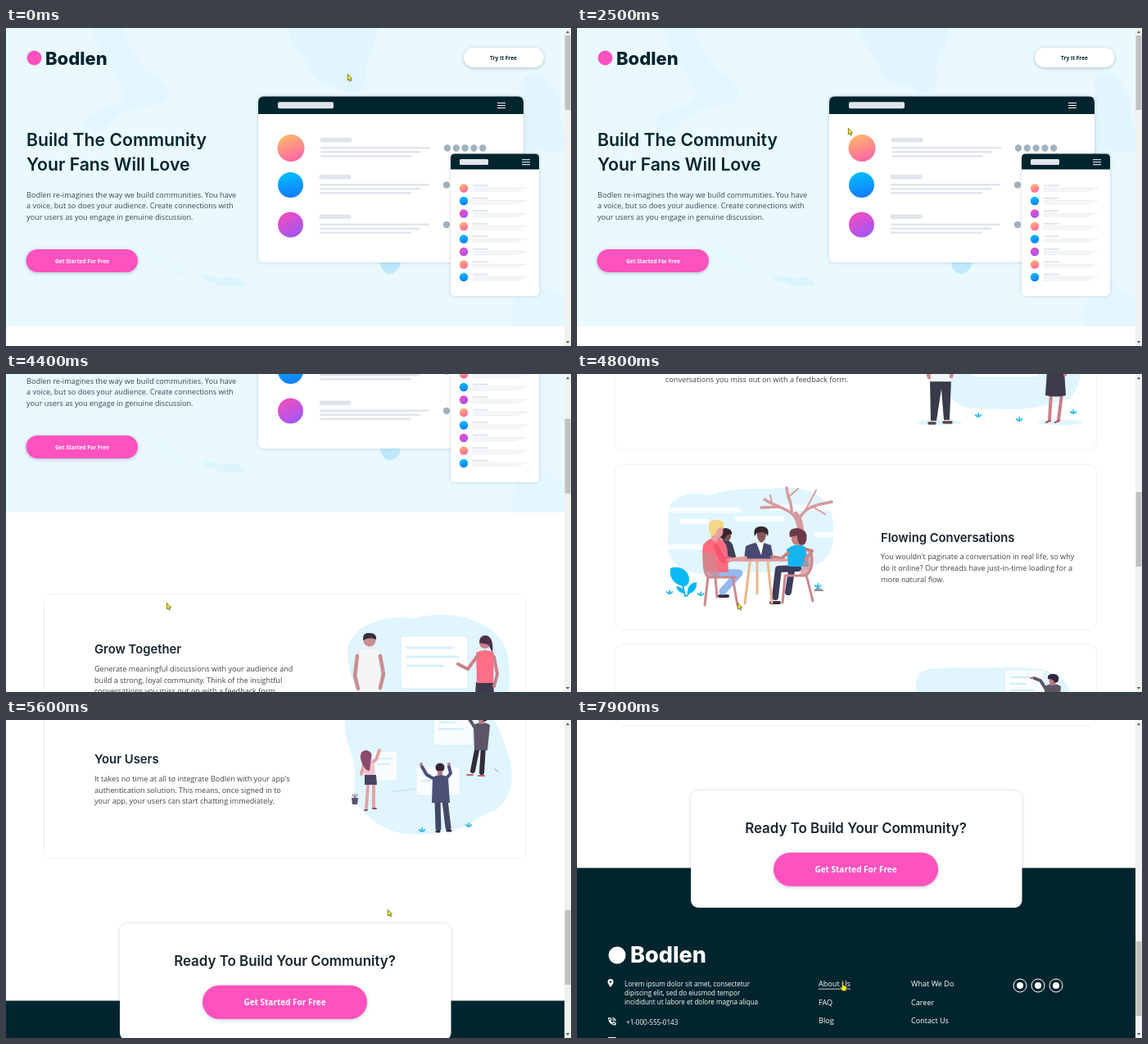
An HTML page that plays this animation: 690 by 388 pixels, repeating every 8 s.

```html
<!DOCTYPE html>
<html lang="en">
<head>
<meta charset="utf-8">
<title>Bodlen landing page</title>
<style>
html, body { margin: 0; width: 100%; height: 100%; overflow: hidden; background: #fff; }
svg { display: block; width: 690px; height: 388px; }
text { font: 9.1px "Open Sans", sans-serif; fill: #3d464d; }
.h, .logo { font-family: Inter, sans-serif; font-weight: 600; fill: #00252e; }
.h1 { font-size: 21.2px; }
.h2 { font-size: 14.8px; fill: #17262f; }
.h3 { font-size: 16.9px; fill: #17262f; }
.logo { font-weight: 800; font-size: 22px; }
.btn { font-weight: 700; font-size: 6.6px; fill: #fff; text-anchor: middle; }
.foot text { fill: #fff; }
.foot .small { font-size: 8.1px; }
.card { fill: #fff; stroke: #f6f0ec; }
.lift { filter: drop-shadow(0 1px 2px #00252e40); }
.soft { filter: drop-shadow(0 0 2px #00252e30); }
.line { fill: none; stroke-linecap: round; stroke-linejoin: round; }
</style>
</head>
<body>
<svg viewBox="0 0 690 388">
  <defs>
    <linearGradient id="warm" x1=".3" y1="0" x2=".7" y2="1"><stop stop-color="#ffb76c"/><stop offset="1" stop-color="#ff62a8"/></linearGradient>
    <linearGradient id="blue" x1=".4" y1="0" x2=".6" y2="1"><stop stop-color="#00bdff"/><stop offset="1" stop-color="#147bff"/></linearGradient>
    <linearGradient id="plum" x1=".2" y1="0" x2=".8" y2="1"><stop stop-color="#f74cbb"/><stop offset="1" stop-color="#9a58fb"/></linearGradient>
    <path id="tuft" fill="#2cbcf0" d="M0 3Q-4 2-4.500-1Q-2-1-.5 1Q-1.500-2 .5-3.500Q1.500-1.500 1 1Q2-1 4.500-1Q4 2 0 3Z"/>
  </defs>
  <g id="page">
    <path fill="#fff" d="M0 0H682V1630H0Z"/>
    <path fill="#e9f9ff" d="M0 0H682V364H0Z"/>
    <g fill="#d6f1fc" opacity=".6">
      <path d="M143 0C150 25 160 42 178 58C202 68 203 90 184 94C160 94 135 102 122 122C105 132 90 120 99 109C113 95 140 100 145 82C142 62 118 38 104 0Z" opacity=".55"/>
      <path d="M344 0C350 26 366 32 372 54C380 72 405 66 416 78C428 82 444 71 441 58C432 42 450 34 455 0Z" opacity=".7"/>
      <path d="M632 62C650 46 661 60 670 76C682 90 672 109 682 124V150C664 154 648 146 632 150Z" opacity=".6"/>
      <path d="M238 303C250 296 258 309 271 304C284 302 291 309 291 315H262C253 309 243 311 238 303Z"/>
      <path d="M160 262C178 270 198 275 216 294C230 302 212 308 202 299C184 288 168 282 160 262Z" opacity=".3"/>
      <path d="M628 287C644 300 660 322 682 327V364H620C609 344 636 321 628 287Z" opacity=".35"/>
    </g>
    <path fill="#bfe9fb" d="M457 286H482C482 294 474 300 469 300C463 300 457 294 457 286Z"/>

    <circle cx="34.5" cy="36.5" r="9" fill="#ff52bf"/>
    <text class="logo" x="48" y="44.5">Bodlen</text>
    <rect class="lift" x="559" y="24" width="97.500" height="24" rx="12" fill="#fff"/>
    <text class="btn" x="607.5" y="38.5" style="fill:#00252e">Try It Free</text>
    <text class="h h1" x="25" y="144">Build The Community</text>
    <text class="h h1" x="25" y="174">Your Fans Will Love</text>
    <g id="intro"></g>
    <rect class="lift" x="24.500" y="270" width="136.500" height="28" rx="14" fill="#ff52bf"/>
    <text class="btn" x="93" y="286.500">Get Started For Free</text>

    <g id="mock"></g>

    <rect class="card" x="46.500" y="463" width="588" height="204" rx="9"/>
    <rect class="card" x="46.500" y="685" width="588" height="202" rx="9"/>
    <rect class="card" x="46.500" y="905" width="588" height="214" rx="9"/>
    <text class="h h2" x="108" y="535.500">Grow Together</text>
    <text class="h h2" x="371" y="779.500">Flowing Conversations</text>
    <text class="h h2" x="108" y="1002.800">Your Users</text>
    <g id="copy"></g>

    <!-- two people at a board -->
    <g transform="translate(0 575)">
      <path fill="#e0f5fe" d="M418-30C410-68 454-88 500-82C550-96 612-74 614-28C618 4 612 20 602 30C570 38 556 44 526 43C490 42 470 46 456 28C434 16 422 4 418-30Z"/>
      <g fill="#e0f5fe"><ellipse cx="442" cy="59" rx="28" ry="3.500"/><ellipse cx="590" cy="59" rx="27" ry="3.500"/></g>
      <rect x="482" y="-60" width="82" height="64" rx="3" fill="#fff" stroke="#d5effa"/>
      <path class="line" stroke="#d5effa" stroke-width="3" d="M490-46H545M490-35H552M490-24H534"/>
      <path fill="#3a3b49" d="M431 6H457L455 56H448L445 18L439 57H432Z"/>
      <path fill="#f3f5f7" stroke="#d8dde2" stroke-width=".6" d="M430-42Q444-50 457-42L458 9H430Z"/>
      <path class="line" stroke="#c98e8f" stroke-width="4.500" d="M429-36L426-12L430 4M457-36L461-14L457 3"/>
      <circle cx="444" cy="-55" r="7.500" fill="#c98e8f"/><path fill="#33303f" d="M436-55Q435-65 444-64Q453-64 452-56Q444-60 436-55Z"/>
      <path class="line" stroke="#5b414a" stroke-width="3.500" d="M430 60H437M448 59H457"/>
      <path class="line" stroke="#c98088" stroke-width="4" d="M579 24L577 56M592 24L588 56"/>
      <path fill="#3d3a4c" d="M574-4H595L597 26Q585 29 572 26Z"/>
      <path fill="#ff6f86" d="M574-40Q585-46 596-40L595-3H575Z"/>
      <path class="line" stroke="#c98088" stroke-width="4" d="M575-35L564-20L552-26M596-35L600-14L596 1"/>
      <circle cx="585" cy="-52" r="7" fill="#c98088"/><path fill="#4b3049" d="M578-52Q578-62 587-61Q596-58 594-40L589-50Z"/>
      <path class="line" stroke="#c04a60" stroke-width="2.200" d="M573 59L578 57M584 59L589 57"/>
      <use href="#tuft" x="490" y="50"/><use href="#tuft" x="540" y="55"/><use href="#tuft" x="606" y="46"/>
    </g>

    <!-- friends around a table -->
    <g transform="translate(0 575)">
      <path fill="#e0f5fe" d="M112 176C107 151 136 140 162 148C196 136 224 142 250 139C286 136 314 153 313 187C315 210 309 228 288 234C255 246 225 240 188 244C148 250 112 238 111 211Z"/>
      <path class="line" stroke="#fff" stroke-width="7" opacity=".8" d="M108 166H196M128 180H158M238 163H315M196 177H250M292 196H315M108 211H150"/>
      <path class="line" stroke="#d79a9d" stroke-width="8" d="M273 196Q274 182 267 172"/>
      <path class="line" stroke="#d79a9d" stroke-width="3.500" d="M270 180C262 164 246 164 229 153M247 162L225 163M262 169C263 158 257 150 256 139M271 178C277 164 288 160 311 156"/>
      <path class="line" stroke="#d79a9d" stroke-width="2" d="M279 166L292 142M286 161L303 171M257 151L270 140M238 157L236 148"/>
      <path class="line" stroke="#00a9e8" stroke-width="1.800" d="M132 271L127 249M134 271L142 260"/>
      <path fill="#08b9f4" d="M130 259C118 257 112 247 114 237C125 233 138 240 137 252C136 257 133 260 130 259ZM132 268C127 268 122 264 121 259C127 259 131 263 132 268ZM135 268C134 260 139 254 146 254C147 262 142 268 135 268Z"/>
      <path class="line" stroke="#3c2f3c" stroke-width="4" d="M174 271H184M237 279H247"/>
      <path fill="#3f3d56" d="M174 205Q184 199 190 208L195 226H176Z"/>
      <circle cx="182" cy="198" r="6" fill="#7f4e50"/><path fill="#39262f" d="M173 199Q172 188 182 188Q190 189 189 196Q183 194 180 202Z"/>
      <path fill="#464a70" d="M206 210Q222 202 237 209L240 226H204Z"/><path fill="#fff" d="M219 206H228L225 221Z"/>
      <path fill="#87565a" d="M220 193H231Q231 204 225 206Q219 203 220 193Z"/><path fill="#39262f" d="M217 198Q214 186 225 186Q236 186 233 198Q231 193 225 193Q219 193 217 198Z"/>
      <path class="line" stroke="#93b9f0" stroke-width="9" d="M166 242L198 243L178 265"/>
      <path fill="#ff6b80" d="M154 209Q162 197 174 200Q184 206 184 218L185 242H158Q151 224 154 209Z"/>
      <path class="line" stroke="#f2566f" stroke-width="7" d="M170 211L178 227L186 226"/>
      <path class="line" stroke="#e8a1a0" stroke-width="3.500" d="M188 226L206 224"/>
      <path fill="#e8a1a0" d="M165 187H178Q180 199 172 200L171 206L164 202Z"/><path fill="#f5d883" d="M164 198Q156 180 168 178Q181 177 179 187Q171 186 169 196Z"/>
      <path class="line" stroke="#3c3d5c" stroke-width="8" d="M270 237L246 238L242 272M262 240L258 266"/>
      <path fill="#14b4ee" d="M256 214Q268 205 279 211L283 235H258Z"/>
      <path class="line" stroke="#c77f82" stroke-width="4" d="M258 218L250 225L238 223M280 214L287 216L279 226"/>
      <path fill="#c77f82" d="M262 196H274V209L265 208Q261 204 262 196Z"/><path fill="#6b3a48" d="M260 199Q257 188 269 188Q283 190 280 203Q278 211 272 208Q268 203 269 197Z"/>
      <path class="line" stroke="#cb8990" stroke-width="3" d="M156 219Q153 240 160 248H194M160 247L156 282M190 248L196 282M169 248L171 272M286 217Q290 236 280 246H254M254 247L251 279M280 245L288 277"/>
      <path fill="#cb8990" opacity=".7" d="M154 219Q165 216 169 222L174 247H160Q152 236 154 219ZM286 217L279 222Q274 236 272 246H281Q289 233 286 217Z"/>
      <path class="line" stroke="#dd9da0" stroke-width="3.500" d="M184 227H256"/>
      <path class="line" stroke="#eab88d" stroke-width="3" d="M211 230L205 280M233 230L238 279M220 229V268"/>
      <path fill="#8696a3" d="M289 265Q293 257 302 265Z"/>
      <use href="#tuft" x="113" y="266"/><use href="#tuft" x="151" y="268"/><use href="#tuft" x="294" y="258"/>
    </g>

    <!-- team pinning notes -->
    <g transform="translate(0 950)">
      <path fill="#e0f5fe" d="M414 1C417-21 443-14 463-17C500-14 528-21 566-14C599-11 601 10 609 29C623 60 621 97 596 111C574 117 561 137 528 137C493 144 465 138 443 118C414 96 432 66 423 45C418 29 412 18 414 1Z"/>
      <g fill="#f9fdff" stroke="#d5eef9">
        <rect x="522" y="-14" width="48" height="45" rx="2"/><rect x="448" y="38" width="30" height="36" rx="2"/><rect x="501" y="57" width="54" height="35" rx="2"/>
      </g>
      <path class="line" stroke="#c6e7f6" stroke-width="1.500" d="M529-5H555M529 3H548M529 11H558M453 47H472M453 54H468M508 66H520M508 74H519M470 88L500 84"/>
      <path class="line" stroke="#e3a0a2" stroke-width="3.800" d="M442 80L440 108M449 80L449 106M446 54L452 48L456 37M437 54L434 66"/>
      <path fill="#f3c3cc" d="M436 51Q444 46 450 53L451 69H438Z"/><path fill="#474463" d="M438 67H452L453 79H438Z"/>
      <path fill="#8d4a6c" d="M433 47Q432 36 441 37Q448 39 446 47L444 62Q437 62 433 47Z"/>
      <path class="line" stroke="#8d4a6c" stroke-width="2" d="M438 110H441M448 108H452"/>
      <path class="line" stroke="#454768" stroke-width="7" d="M527 98L528 132M536 98L540 131"/>
      <path fill="#4c5076" d="M521 70Q531 64 540 70L542 101H520Z"/>
      <path class="line" stroke="#4c5076" stroke-width="4" d="M523 72L514 67L508 57M538 71L543 65L541 57"/>
      <circle cx="507" cy="54" r="2" fill="#b87680"/><circle cx="541" cy="54" r="2" fill="#b87680"/>
      <circle cx="530" cy="58" r="5.500" fill="#35263a"/><path fill="#b87680" d="M527 62H533V67H527Z"/>
      <path class="line" stroke="#2f2e41" stroke-width="3" d="M526 136H529M539 135H543"/>
      <path class="line" stroke="#302d38" stroke-width="6" d="M576 32L570 62M583 32L581 64"/>
      <path fill="#5d5566" d="M571 6Q582 0 591 6L588 37H572Z"/><path class="line" stroke="#5d5566" stroke-width="4" d="M573 10L566-1L558-4"/>
      <path class="line" stroke="#c9656f" stroke-width="2" d="M554-4H557M563 67H570M577 68H584"/>
      <path fill="#b87680" d="M576-4H584V5H578Z"/><path fill="#35263a" d="M575-3Q574-10 582-9Q591-8 587 1L583 2Q583-3 575-3Z"/>
      <path fill="#57536e" d="M422 95H430L429 103H423Z"/><path class="line" stroke="#57536e" d="M426 95V90M425 94L423 91M427 94L429 91"/>
      <use href="#tuft" x="508" y="134"/><use href="#tuft" x="565" y="128"/><path class="line" stroke="#8696a3" d="M597 60L601 63"/>
    </g>

    <path fill="#00252e" d="M0 1292.500H682V1630H0Z"/>
    <rect class="soft" x="139" y="1198.300" width="404.500" height="142.700" rx="9" fill="#fff"/>
    <text class="h h3" x="340.500" y="1249.500" text-anchor="middle">Ready To Build Your Community?</text>
    <rect id="cta" class="lift" x="240" y="1273.700" width="201" height="41" rx="20.500" fill="#ff52bf"/>
    <text class="btn" x="340.500" y="1297.500" style="font-size:10px">Get Started For Free</text>
    <g class="foot" transform="translate(0 1112)">
      <circle cx="49" cy="287" r="10.500" fill="#fff"/>
      <text class="logo" x="65" y="296" style="font-size:27px">Bodlen</text>
      <path fill="#fff" fill-rule="evenodd" d="M41 326C38 322 37.500 321 37.500 319.500A3.500 3.500 0 0 1 44.500 319.500C44.500 321 44 322 41 326ZM39.800 319.500A1.200 1.200 0 0 0 42.200 319.500A1.200 1.200 0 0 0 39.800 319.500Z"/>
      <path class="line" stroke="#fff" stroke-width="1.200" d="M39 363.500L41 363.500L41.500 366L40.500 367Q41.500 369 43.500 370L44.500 369L47 369.700V371.800Q40 372.500 38.500 364ZM43.500 363.500Q46.500 364 47 367M43.500 365.500Q45 366 45 367.300"/>
      <rect x="38" y="387" width="9.500" height="7" fill="#fff"/>
      <text class="small" x="58" y="325">Lorem ipsum dolor sit amet, consectetur</text>
      <text class="small" x="58" y="336">dipiscing elit, sed do eiusmod tempor</text>
      <text class="small" x="58" y="347">incididunt ut labore et dolore magna aliqua</text>
      <text class="small" x="60" y="371.500">+1-000-555-0143</text>
      <g id="links"></g>
      <path id="under" fill="#fff" d="M295 327.700H334V328.500H295Z"/>
      <g fill="none" stroke="#fff"><circle cx="541" cy="324" r="8"/><circle cx="563" cy="324" r="8"/><circle cx="585" cy="324" r="8"/></g>
      <g fill="#fff"><circle cx="541" cy="324" r="4"/><circle cx="563" cy="324" r="4"/><circle cx="585" cy="324" r="4"/></g>
    </g>
  </g>

  <path fill="#f1f1f1" d="M682 0H690V388H682Z"/>
  <path fill="#555" d="M683.800 6.200L686 3.500L688.200 6.200ZM683.800 382L686 384.700L688.200 382Z"/>
  <rect id="thumb" x="682.500" width="7" height="91" fill="#c1c1c1"/>
  <g id="pointer" fill="#f7ee1c" stroke="#4d4b26" stroke-width=".7" stroke-linejoin="round">
    <path id="arrow" d="M.3 .3V8L2 6.500L3.300 9.200L4.600 8.600L3.400 6H5.600Z"/>
    <path id="hand" d="M-.8 .2Q0-.8 .9 .2V4L4.300 5Q5 5.300 4.800 6.500L4 10.500H-.2L-2.800 6.600Q-2.600 5.300-.8 6.300Z"/>
  </g>
</svg>
<script>
const $ = id => document.getElementById(id);
const bar = (x, y, w, h, fill, more = "") =>
  `<rect x="${x}" y="${y}" width="${w}" height="${h}" fill="${fill}" ${more}/>`;
const dot = (x, y, r, fill) => `<circle cx="${x}" cy="${y}" r="${r}" fill="${fill}"/>`;
const lines = (x, y, step, list) =>
  list.map((s, i) => `<text x="${x}" y="${y + i * step}">${s}</text>`).join("");

const tints = ["url(#warm)", "url(#blue)", "url(#plum)"];
const ink = "#00252e", pale = "#e0e5ec", grey = "#a2b3bf";

function frame(x, y, w, h, head, r) {
  return bar(x, y, w, h, "#fff", `rx="${r}" class="soft"`) +
    `<path fill="${ink}" d="M${x} ${y + head}V${y + r}Q${x} ${y} ${x + r} ${y}H${x + w - r}Q${x + w} ${y} ${x + w} ${y + r}V${y + head}Z"/>`;
}
const burger = (x, y) => [0, 3, 6].map(d => bar(x, y + d, 10, 1, "#fff")).join("");

function mock() {
  let s = frame(308, 83.5, 324, 202.5, 21.5, 7);
  s += bar(332, 90.3, 68, 8, pale, 'rx="2"') + burger(600, 91);
  [146.5, 191.5, 240].forEach((y, i) => {
    const x = i ? 383 : 384;
    s += dot(i ? 347.5 : 348, y, i ? 15.5 : 16.5, tints[i]);
    s += bar(x - .5, y - 12.5, 39, 5.5, pale, 'rx="2"');
    [134, 123, 112].forEach((w, k) => s += bar(x, y - 1.5 + k * 5, w, 2.4, pale, 'rx="1.2"'));
    for (let k = 0; k < (i ? 1 : 5); k++) s += dot((i ? 538 : 539) + k * 10.8, y, 4.2, grey);
  });
  s += frame(543, 153.5, 108, 173.5, 19, 5);
  s += bar(554, 160, 35, 7, pale, 'rx="1.5"') + burger(630, 160.2);
  for (let i = 0; i < 8; i++) {
    const y = 195.5 + i * 15.5;
    s += dot(559, y, 5.2, tints[i % 3]) + bar(569.5, y - 4.2, 19.5, 2, pale, 'rx="1"');
    [67, 61, 56].forEach((w, k) => s += bar(569.5, y - .7 + k * 2, w, .8, pale));
  }
  return s;
}

$("mock").innerHTML = mock();
$("intro").innerHTML = lines(25, 206.5, 13.7, [
  "Bodlen re-imagines the way we build communities. You have",
  "a voice, but so does your audience. Create connections with",
  "your users as you engage in genuine discussion."]);
$("copy").innerHTML =
  lines(108, 557.8, 13.7, [
    "Generate meaningful discussions with your audience and",
    "build a strong, loyal community. Think of the insightful",
    "conversations you miss out on with a feedback form."]) +
  lines(371, 801.3, 13.7, [
    "You wouldn't paginate a conversation in real life, so why",
    "do it online? Our threads have just-in-time loading for a",
    "more natural flow."]) +
  lines(108, 1024.8, 13.7, [
    "It takes no time at all to integrate Bodlen with your app's",
    "authentication solution. This means, once signed in to",
    "your app, your users can start chatting immediately."]);
$("links").innerHTML =
  lines(295, 325, 22.7, ["About Us", "FAQ", "Blog"]) +
  lines(408, 325, 22.7, ["What We Do", "Career", "Contact Us"]);

// [ms, scroll] and [ms, x, y]
const scroll = [[3900, 0], [4000, 7], [4200, 100], [4300, 100], [4800, 575],
  [5200, 760], [5600, 950], [6000, 1112]];
const path = [[1900, 417, 56], [2500, 331, 122], [2900, 262, 200], [3500, 196, 279],
  [4900, 196, 279], [5500, 466, 231], [5700, 466, 231], [6100, 363, 177],
  [7100, 363, 177], [7700, 324.5, 320]];

function at(keys, t, c = 1) {
  const i = keys.findIndex(k => k[0] > t);
  if (i === 0) return keys[0][c];
  if (i < 0) return keys[keys.length - 1][c];
  const a = keys[i - 1], b = keys[i];
  return a[c] + (b[c] - a[c]) * (t - a[0]) / (b[0] - a[0]);
}
const inside = (x, y, l, t, r, b) => x >= l && x <= r && y >= t && y <= b;
const show = (id, on) => $(id).setAttribute("visibility", on ? "visible" : "hidden");

function draw(now) {
  const t = Math.floor(now % 8000 / 100) * 100;
  const s = at(scroll, t), x = at(path, t), y = at(path, t, 2);
  const onCta = inside(x, y + s, 240, 1274, 441, 1314);
  const onLink = inside(x, y + s, 295, 1427, 334, 1442);
  $("page").setAttribute("transform", `translate(0 ${-s})`);
  $("thumb").setAttribute("y", 9 + s / 4.26);
  $("pointer").setAttribute("transform", `translate(${x} ${y})`);
  $("cta").setAttribute("fill", onCta ? "#ff8cd5" : "#ff52bf");
  show("hand", onCta || onLink);
  show("arrow", !onCta && !onLink);
  show("under", onLink);
  requestAnimationFrame(() => draw(performance.now()));
}
draw(performance.now());
</script>
</body>
</html>
```
